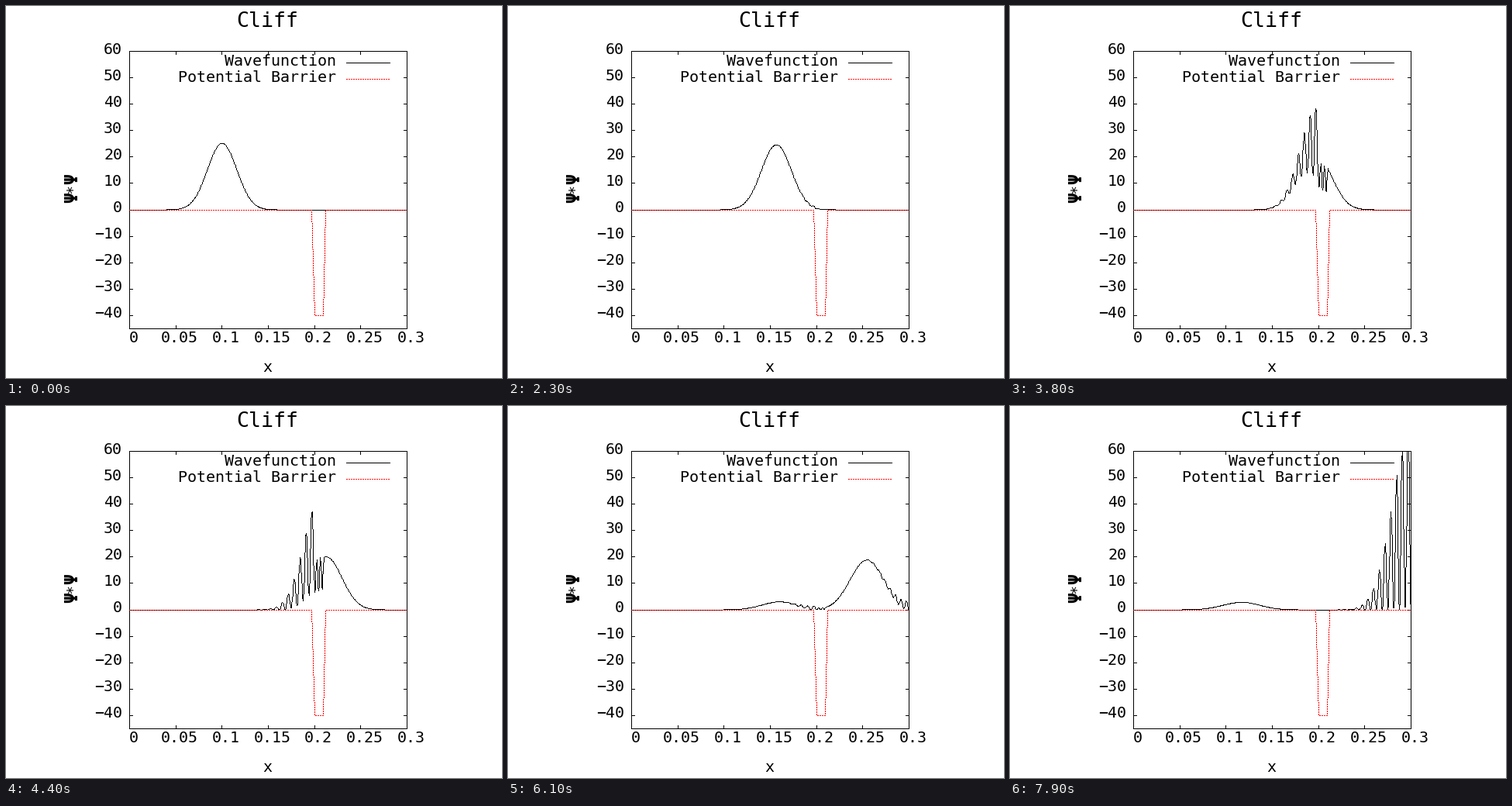
A matplotlib script for the animation above (8 s loop, 640x480 px).

```python
import numpy as np
import matplotlib.pyplot as plt
from matplotlib.animation import FuncAnimation

W, H, DPI = 640, 480, 100
PX = 72 / DPI                       # one pixel in points
FRAMES, INTERVAL = 80, 100

# Plot box in pixels and its data ranges
LEFT, TOP, SIDE = 159, 58, 358
RIGHT, BOTTOM = LEFT + SIDE, TOP + SIDE
X_MAX, Y_MIN, Y_MAX = 0.3, -45, 60

# Wave packet meeting a square well, hard walls at both ends
N = 600
DX = X_MAX / N
X0, K0, V0, DT = 0.1, 500, -2.0e5, 4.97e-6


def px(x):
    return LEFT + np.asarray(x) * SIDE / X_MAX


def py(y):
    return TOP + (Y_MAX - np.asarray(y)) * SIDE / (Y_MAX - Y_MIN)


def solve():
    """Grid, energies, modes and the packet's mode amplitudes."""
    x = np.arange(N + 1) * DX
    i = np.arange(1, N)
    v = np.where((i >= 400) & (i <= 420), V0, 0.0)
    hop = np.full(N - 2, -0.5 / DX**2)
    ham = np.diag(1 / DX**2 + v) + np.diag(hop, 1) + np.diag(hop, -1)
    energy, modes = np.linalg.eigh(ham)
    psi = np.exp(-1000 * (x[1:-1] - X0) ** 2 + 1j * K0 * x[1:-1])
    psi /= np.sqrt(np.sum(np.abs(psi) ** 2) * DX)
    return x, energy, modes, modes.T @ psi


x, energy, modes, amp = solve()


def density(n):
    psi = modes @ (amp * np.exp(-1j * energy * n * DT))
    return np.pad(np.abs(psi) ** 2, 1)


def snap(a):
    return np.floor(np.asarray(a, float) + 0.5)


def trace(xs, ys, dotted=False):
    """Walk a polyline pixel by pixel; return one short dash per pixel."""
    xs, ys = snap(xs), snap(ys)
    steps = np.maximum(np.abs(np.diff(xs)), np.abs(np.diff(ys)))
    s = np.concatenate([[0], np.cumsum(steps)])
    t = np.arange(s[-1] + 1)
    col, row = snap(np.interp(t, s, xs)), snap(np.interp(t, s, ys))
    keep = row >= TOP
    if dotted:
        keep &= t % 3 < 2
    col, row = col[keep], row[keep]
    gap = np.full(len(col), np.nan)
    return np.column_stack([col, col + 1, gap]).ravel(), np.repeat(row + 0.5, 3)


plt.rcParams["path.simplify"] = False
fig = plt.figure(figsize=(W / DPI, H / DPI), dpi=DPI, facecolor="white")
ax = fig.add_axes([0, 0, 1, 1])
ax.set_xlim(0, W)
ax.set_ylim(H, 0)
ax.axis("off")


def line(xs, ys, color="black", dotted=False, **kw):
    return ax.plot(*trace(xs, ys, dotted), color=color, lw=PX, snap=False,
                   solid_capstyle="butt", **kw)[0]


def text(x, y, s, size=20, ha="center", va="baseline", **kw):
    ax.text(x, y, s, fontsize=size * PX, ha=ha, va=va,
            family="DejaVu Sans Mono", **kw)


def draw_axes():
    line([LEFT, RIGHT, RIGHT, LEFT, LEFT], [TOP, TOP, BOTTOM, BOTTOM, TOP])
    for v in range(-40, 61, 10):
        y = py(v)
        line([LEFT, LEFT + 4], [y, y])
        line([RIGHT - 4, RIGHT], [y, y])
        text(150, y + 3.5, str(v).replace("-", "\u2212"), ha="right")
    for k in range(7):
        v = 0.05 * k
        t = px(v)
        line([t, t], [TOP, TOP + 4])
        line([t, t], [BOTTOM - 4, BOTTOM])
        text(t + 5.5, 434, f"{v:.2g}")


def draw_labels():
    text(337, 27, "Cliff", size=26.67)
    text(337, 472, "x")
    for y in (247.5, 223.5):
        text(85.5, y, "\u03a8", size=23, rotation=90, va="center",
             weight="bold")
    text(85.5, 235.5, "*", rotation=90, va="center")
    text(426, 77, "Wavefunction", ha="right")
    text(426, 98, "Potential Barrier", ha="right")
    line([439, 495], [73, 73])
    line([439, 495], [94, 94], "red", dotted=True)


draw_axes()
draw_labels()

# The well is drawn from 100 samples, which slants its sides
xs = np.linspace(0, X_MAX, 100)
well = np.where((xs > 0.1999) & (xs < 0.2101), -40, 0)
wave = line([LEFT, RIGHT], [py(0)] * 2, zorder=4)
line(px(xs), py(well), "red", dotted=True, zorder=5)


def update(n):
    wave.set_data(*trace(px(x), py(density(n))))
    return [wave]


anim = FuncAnimation(fig, update, frames=FRAMES, interval=INTERVAL,
                     repeat=True, repeat_delay=0)
plt.show()
```
